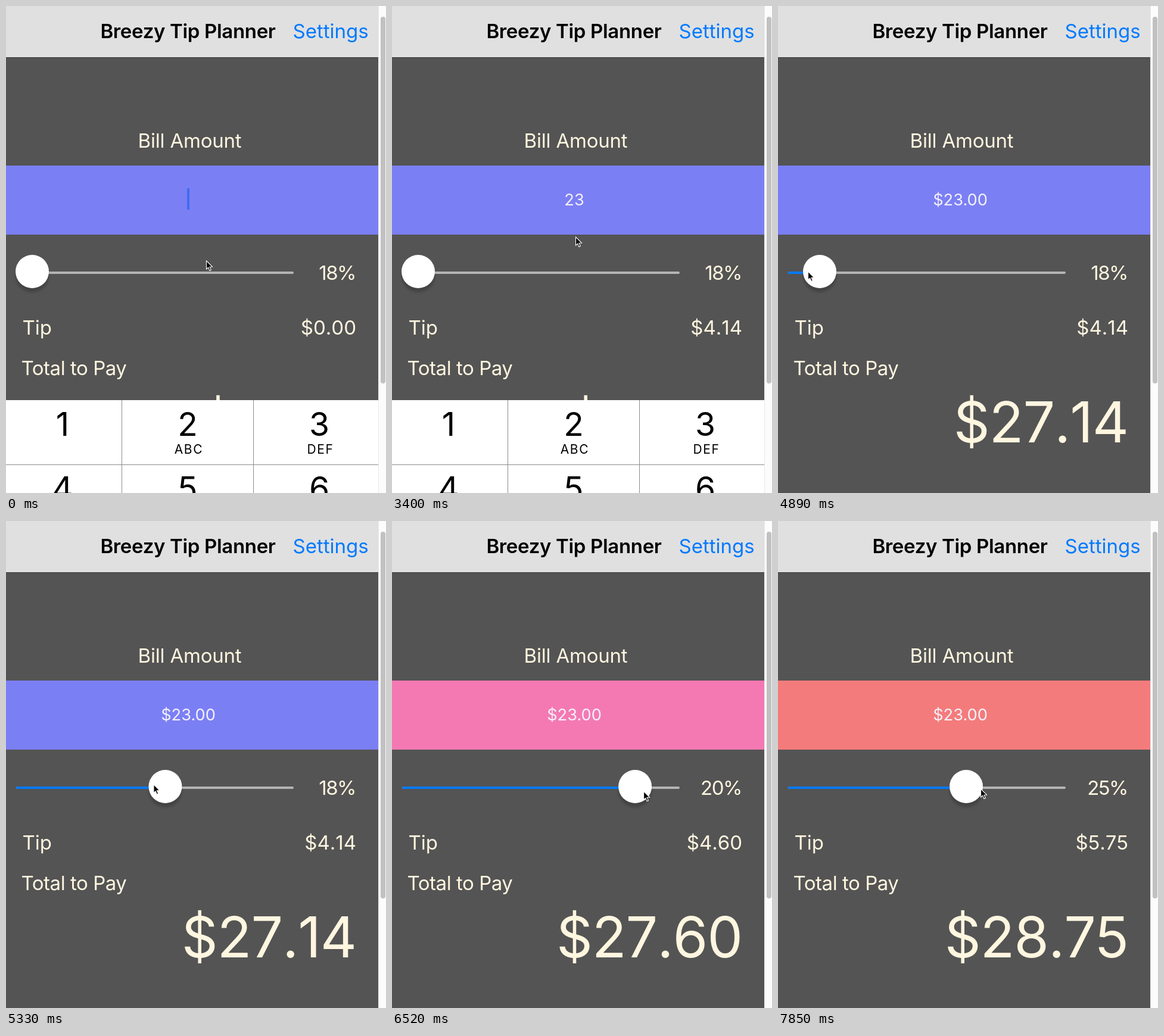
An HTML page with a canvas for the animation above (8 s loop, 638 by 818 pixels).

```html
<!DOCTYPE html>
<html lang="en">
<head>
<meta charset="utf-8">
<title>Tip planner</title>
<style>
html, body { margin: 0; width: 100%; height: 100%; overflow: hidden; background: #fcfcfc; }
canvas { display: block; }
</style>
</head>
<body>
<canvas id="stage" width="638" height="818"></canvas>
<script>
const ctx = document.getElementById('stage').getContext('2d');
const LOOP = 8000, STEP = 148.1;   // the screen refreshes once per STEP ms
const CREAM = '#fff6e0', BLUE = '#007aff', LINE = '#8c8c8c';
const SLIDE_MIN = 44, SLIDE_MAX = 456;

// Pointer moves: first step, last step, destination
const MOVES = [
  [5, 7, 311, 347], [20, 23, 308, 387], [25, 31, 24, 445],
  [31, 33, 50, 445], [33, 37, 284, 441],
  [39, 41, 264, 446], [41, 46, 508, 457],
  [47, 50, 480, 450], [50, 53, 340, 449]
];
// Slider drags: grab step, release step, distance from pointer to thumb
const DRAGS = [[31, 37, 20], [41, 46, -14], [50, 99, -24]];

const clamp = (v, lo, hi) => Math.min(hi, Math.max(lo, v));

function ease(n, from, to) {
  const p = clamp((n - from) / (to - from), 0, 1);
  return p * p * (3 - 2 * p);
}

function mouseAt(n) {
  let x = 336, y = 427;
  for (const [from, to, toX, toY] of MOVES) {
    const p = ease(n, from, to);
    x += (toX - x) * p;
    y += (toY - y) * p;
  }
  return [x, y];
}

function thumbAt(n, level, mouseX) {
  const drag = DRAGS.find(([grab, release]) => n >= grab && n < release);
  return drag ? clamp(mouseX + drag[2], SLIDE_MIN, SLIDE_MAX)
              : SLIDE_MIN + (SLIDE_MAX - SLIDE_MIN) * level / 2;
}

function rect(x, y, w, h, color) {
  ctx.fillStyle = color;
  ctx.fillRect(x, y, w, h);
}

function pill(x, y, w, h, color) {
  ctx.fillStyle = color;
  ctx.beginPath();
  ctx.roundRect(x, y, w, h, Math.min(w, h) / 2);
  ctx.fill();
}

function text(s, x, y, { size = 33, color = CREAM, align = 'left', weight = 400, gap = 0, kern = 'normal' } = {}) {
  ctx.font = `${weight} ${size}px Inter, sans-serif`;
  ctx.letterSpacing = gap * size + 'px';
  ctx.fontKerning = kern;
  ctx.textAlign = align;
  ctx.fillStyle = color;
  ctx.fillText(s, x, y);
}

const money = v => '$' + v.toFixed(2);

function drawSlider(x) {
  pill(17, 446, 466, 4, '#b4b4b4');
  pill(17, 446, x - 17, 4, BLUE);
  ctx.save();
  ctx.shadowColor = 'rgba(0,0,0,.2)';
  ctx.shadowBlur = 4;
  ctx.shadowOffsetY = 7;
  pill(x - 28, 418, 56, 56, '#fff');
  ctx.restore();
}

function drawKeypad(top) {
  rect(0, top, 625, 432, '#fff');
  for (const x of [194, 415]) rect(x, top, 1, 432, LINE);
  rect(0, top + 108, 625, 1, LINE);
  ['', 'ABC', 'DEF', 'GHI', 'JKL', 'MNO'].forEach((label, i) => {
    const x = [95, 305, 526][i % 3], y = top + 108 * Math.floor(i / 3);
    text(i + 1, x, y + 60, { size: 55, color: '#000', align: 'center' });
    text(label, x + 2, y + 90, { size: 21, color: '#000', align: 'center', gap: .08 });
  });
}

function drawMouse(x, y) {
  ctx.beginPath();
  [[.5, 1], [.5, 15], [3.6, 12.2], [6, 17.5], [8.3, 16.5], [6, 11.2], [10.5, 11]]
    .forEach(([dx, dy]) => ctx.lineTo(x + dx, y + dy));
  ctx.closePath();
  ctx.fillStyle = '#000';
  ctx.fill();
  ctx.strokeStyle = '#fff';
  ctx.lineWidth = 1.1;
  ctx.stroke();
}

function draw(n) {
  const bill = n < 17 ? 0 : n < 19 ? 2 : 23;
  const level = DRAGS.filter(([, release]) => n >= release).length;
  const percent = [18, 20, 25][level];
  const tip = bill * percent / 100;
  const entry = n < 17 ? '' : n < 26 ? String(bill) : money(bill);
  const caretOn = n < 22 && (n >= 17 || (n + 1) % 7 < 4);
  const [mouseX, mouseY] = mouseAt(n);
  const amount = { align: 'right', kern: 'none' };

  rect(0, 0, 625, 818, '#545454');
  rect(0, 0, 625, 86, '#e0e0e0');
  rect(0, 86, 625, 1, '#3c3c3c');
  text('Breezy Tip Planner', 305.5, 54, { color: '#000', align: 'center', weight: 600, gap: -.01 });
  text('Settings', 481.5, 54, { color: BLUE });

  text('Bill Amount', 308.5, 238, { align: 'center', gap: -.006 });
  rect(0, 268, 625, 116, ['#7b7ff4', '#f479b3', '#f47b7b'][level]);
  text(entry, 306, 335, { size: 27.2, color: '#f3f0fa', align: 'center' });
  if (caretOn) rect(304 + 8.5 * entry.length, 306, 4, 36, '#426bf2');

  drawSlider(thumbAt(n, level, mouseX));
  text(percent + '%', 587, 460, { align: 'right', gap: -.045 });
  text('Tip', 27.5, 552);
  text(money(tip), 588, 552, amount);
  text('Total to Pay', 25.5, 620, { gap: -.014 });
  text(money(bill + tip), 588, 733, { ...amount, size: 95, gap: -.012 });

  const top = 662 + 432 * ease(n, 25, 28);
  if (top < 818) drawKeypad(top);

  rect(625, 0, 13, 818, '#fcfcfc');
  rect(625, 0, 1, 818, '#e8e8e8');
  pill(629, 18, 8, 616, '#c1c1c1');
  drawMouse(mouseX, mouseY);
}

function tick(now) {
  draw(Math.floor((now % LOOP + 8) / STEP));
  requestAnimationFrame(tick);
}
requestAnimationFrame(tick);
</script>
</body>
</html>
```
